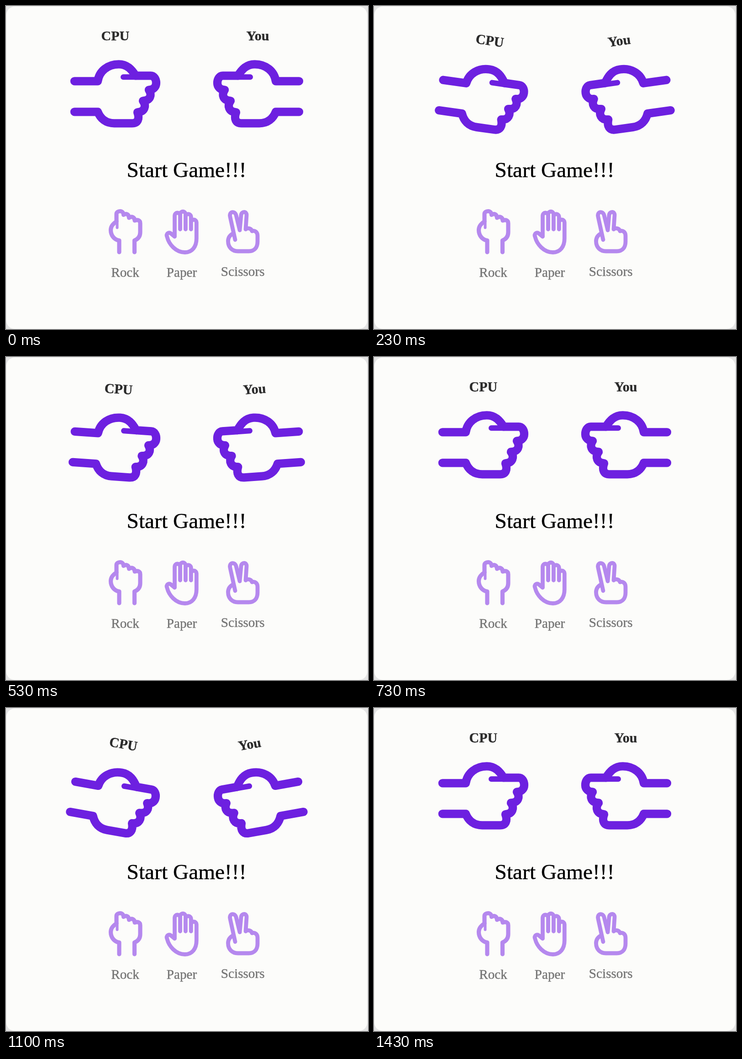
Write an HTML page with a canvas that moves like this. It is 793 px wide and 706 px high and loops after 1460 ms.

```html
<!DOCTYPE html>
<html lang="en">
<head>
<meta charset="utf-8">
<title>Rock Paper Scissors</title>
<style>
  html, body { margin: 0; width: 100%; height: 100%; overflow: hidden; background: #e4e4e4; }
  canvas { display: block; }
</style>
</head>
<body>
<canvas id="stage" width="793" height="706"></canvas>
<script>
const ctx = document.getElementById('stage').getContext('2d');

const LOOP = 1460, STEP = 100 / 3;
const SHAKE_START = 60, SHAKE_HALF = 350, SHAKE_ANGLE = 10;
const PIVOT = { x: 169.5, y: 174 };
const MIRROR_WIDTH = 792;
const PURPLE = '#6d20e0', PALE = '#b588ee';

const rock = new Path2D(`M150 164H201C204 142 223 127 247 127C265 127 275 138 284 152
  H317C324 152 329 159 329 168C329 177 322 183 313 183C320 194 317 206 300 207
  C308 218 304 231 288 232C293 246 289 256 276 256H237C219 256 207 246 201 231H150`);
const thumb = new Path2D('M257 155H285');

const paper = new Path2D(`M381.5 488V458A6 6 0 0 0 369.5 458V504L361 497
  C356 493 350 498 353 505C357 521 372 538.5 392 538.5
  C408 538.5 417.3 526 417.3 508V473A6 6 0 0 0 405.3 473V488
  M405.3 474V460A6 6 0 0 0 393.4 460V488
  M393.4 461V454.5A6 6 0 0 0 381.5 454.5V459`);

const scissors = new Path2D(`M502 511L491 461C488 449 501 447 504 457L512 490
  L515 457C516 448 528 448 527 458L525 488C530 484 537 486 539 492
  C545 490 551 494 551 502V515C551 528 544 536 532 536H508
  C495 536 486.5 527 486.5 514C486.5 506 490 501 498 497`);

// The CSS "ease" curve, solved for its parameter by bisection.
function ease(x) {
  let low = 0, high = 1;
  for (let i = 0; i < 24; i++) {
    const s = (low + high) / 2;
    if (0.75 * s * (1 - s) + s ** 3 < x) low = s; else high = s;
  }
  const s = low;
  return 0.3 * s * (1 - s) ** 2 + 3 * s * s * (1 - s) + s ** 3;
}

function shakeAngle(time) {
  const phase = (time - SHAKE_START) / SHAKE_HALF;
  if (phase <= 0) return 0;
  const part = ease(phase % 1);
  const amount = Math.floor(phase) % 2 ? 1 - part : part;
  return amount * SHAKE_ANGLE * Math.PI / 180;
}

function stroke(path, width, color) {
  ctx.lineWidth = width;
  ctx.strokeStyle = color;
  ctx.stroke(path);
}

// A hairline outline gives the text its slightly heavier weight.
function text(label, x, y, size, color, weight = 'normal') {
  ctx.font = `${weight} ${size}px "Liberation Serif", "Times New Roman", serif`;
  ctx.fillStyle = ctx.strokeStyle = color;
  ctx.lineWidth = 0.4;
  ctx.fillText(label, x, y);
  ctx.strokeText(label, x, y);
}

function drawFist(color) {
  stroke(rock, 18.3, color);
  stroke(thumb, 12, color);
}

function rotateAbout(x, y, angle) {
  ctx.translate(x, y);
  ctx.rotate(angle);
  ctx.translate(-x, -y);
}

function drawPlayer(name, nameX, angle, mirrored) {
  ctx.save();
  rotateAbout(mirrored ? MIRROR_WIDTH - PIVOT.x : PIVOT.x, PIVOT.y, mirrored ? -angle : angle);
  text(name, nameX, 75, 30, '#2b2b2b', 'bold');
  if (mirrored) ctx.transform(-1, 0, 0, 1, MIRROR_WIDTH, 0);
  ctx.translate(0, 0.3);
  drawFist(PURPLE);
  ctx.restore();
}

function drawChoices() {
  ctx.save();
  ctx.transform(0, -0.5, 0.5, 0, 166, 613);
  drawFist(PALE);
  ctx.restore();
  stroke(paper, 8.8, PALE);
  stroke(scissors, 8.8, PALE);
  text('Rock', 261, 592, 29.2, '#757575');
  text('Paper', 385, 592, 29.2, '#757575');
  text('Scissors', 518.7, 590, 29.2, '#757575');
}

function drawCard() {
  ctx.fillStyle = '#e4e4e4';
  ctx.fillRect(0, 0, 793, 706);
  ctx.fillStyle = '#fcfcfa';
  ctx.beginPath();
  ctx.roundRect(0.5, 1, 791, 705, 19);
  ctx.fill();
}

function render(now) {
  const time = Math.floor((now % LOOP) / STEP + 0.12) * STEP;
  const angle = shakeAngle(time);
  drawCard();
  drawPlayer('CPU', 239.3, angle, false);
  drawPlayer('You', 551.5, angle, true);
  text('Start Game!!!', 395.5, 374, 47.4, '#000');
  drawChoices();
}

ctx.lineCap = ctx.lineJoin = 'round';
ctx.textAlign = 'center';

const start = performance.now();
function tick() {
  render(performance.now() - start);
  requestAnimationFrame(tick);
}
tick();
</script>
</body>
</html>
```
